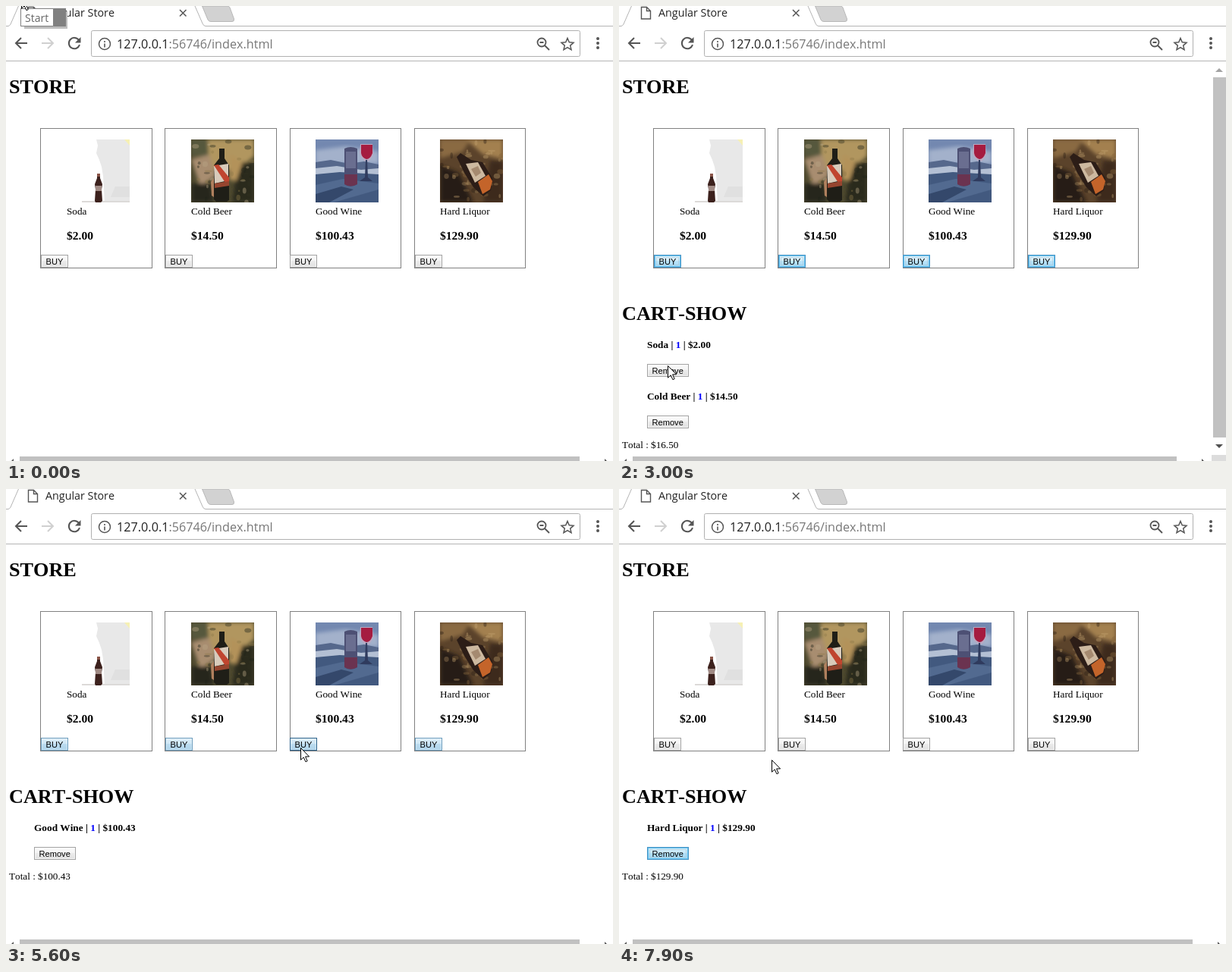
Write an HTML page that moves like this. It is 800 px wide and 600 px high and loops after 8000 ms.

```html
<!DOCTYPE html>
<html lang="en">
<head>
<meta charset="utf-8">
<title>Store</title>
<style>
  html, body { margin: 0; width: 100%; height: 100%; overflow: hidden; background: #fff; }
  svg { display: block; width: 800px; height: 600px; }
  text { font: 13.2px "Liberation Serif", serif; white-space: pre; font-kerning: none; }
  .ui { font-family: "Open Sans", sans-serif; }
  .bold { font-size: 13.3px; font-weight: bold; }
  .h1 { font-size: 26.2px; font-weight: bold; }
  .price { font-size: 15.6px; font-weight: bold; }
  .btn text { font: 11.1px "Liberation Sans", sans-serif; }
  .btn .face { fill: url(#normal); stroke: #a2a2a2; }
  .btn .inner { fill: none; stroke: #fcfcfc; stroke-opacity: .7; }
  .btn .pulse { fill: #7cc6ee; opacity: 0; }
  .hover .face { fill: url(#hover); stroke: #6c9dbd; }
  .hover .inner { stroke-opacity: .35; }
  .over .face { stroke: #2c628b; }
  .focus .face { fill: url(#focus); stroke: #4a94c4; }
  .focus .inner { stroke: #62c0ee; stroke-opacity: 1; }
  .focus .pulse { opacity: var(--pulse); }
  .dots { fill: none; stroke: none; }
  .focus .dots { stroke: #a3bccb; stroke-dasharray: 1 1; }
  .icon { fill: none; stroke: #555; stroke-width: 2; }
</style>
</head>
<body>
<svg viewBox="0 0 800 600">
  <defs>
    <linearGradient id="normal" x2="0" y2="1">
      <stop stop-color="#fbfbfb"/><stop offset=".5" stop-color="#f3f3f3"/>
      <stop offset=".5" stop-color="#ebebeb"/><stop offset="1" stop-color="#e0e0e0"/>
    </linearGradient>
    <linearGradient id="hover" x2="0" y2="1">
      <stop stop-color="#deeef8"/><stop offset=".5" stop-color="#cde6f5"/>
      <stop offset=".5" stop-color="#bcdcf0"/><stop offset="1" stop-color="#add3ea"/>
    </linearGradient>
    <linearGradient id="focus" x2="0" y2="1">
      <stop stop-color="#e4f4fd"/><stop offset=".5" stop-color="#d2edfb"/>
      <stop offset=".5" stop-color="#bce4fa"/><stop offset="1" stop-color="#a5daf7"/>
    </linearGradient>
    <clipPath id="frame"><path d="M0 0h83v83H0z"/></clipPath>
    <filter id="soft"><feGaussianBlur stdDeviation="2.500"/></filter>
  </defs>

  <g id="browser">
    <path d="M0 26.500H3Q5 26 6 24L16.500 0M249 0L259 23Q260.500 26.500 263 26.500H800M0 72.500H800" fill="none" stroke="#b4b4b4"/>
    <path d="M258.500 0H292Q294 0 295 2L300.500 17Q301 20.500 298 20.500H270Q267 20.500 266 18Z" fill="#d2d2d2" stroke="#b8b8b8"/>
    <path d="M29.500 1.500H36.500L41.500 6.500V17H29.500ZM36.500 1.500V6.500H41.500" fill="#fff" stroke="#555" stroke-width="1.400"/>
    <text class="ui" x="52" y="14" style="font-size:14.300px" fill="#222">Angular Store</text>
    <path class="icon" d="M229 5l8.500 8.500M237.500 5l-8.500 8.500" style="stroke-width:1.500"/>
    <path class="icon" d="M28 49H13M20 42L13 49L20 56"/>
    <path class="icon" d="M47 49H62M55 42L62 49L55 56" style="stroke:#d0d0d0"/>
    <path class="icon" d="M96 45A7.200 7.200 0 1 0 97 51"/>
    <path d="M98.500 41V48.500H91Z" fill="#555"/>
    <rect x="112.500" y="32.500" width="644" height="34" rx="2" fill="#fff" stroke="#b0b0b0"/>
    <circle class="icon" cx="130" cy="50" r="7.500" style="stroke-width:1.500"/>
    <path class="icon" d="M130 46v2M130 49.500v5" style="stroke-width:1.600"/>
    <text class="ui" x="146" y="56" style="font-size:16.200px" fill="#222">127.0.0.1<tspan fill="#777">:56746/index.html</tspan></text>
    <circle class="icon" cx="706" cy="48" r="5.500" style="stroke-width:1.800"/>
    <path class="icon" d="M710 52L716 58M703.500 48h5" style="stroke-width:1.800"/>
    <path class="icon" d="M740 42.500l2.300 5.300 5.700.5-4.300 3.800 1.300 5.600-5-3-5 3 1.300-5.600-4.300-3.800 5.700-.5z" style="stroke-width:1.500"/>
    <path d="M780 43h.01M780 49h.01M780 55h.01" stroke="#555" stroke-width="4" stroke-linecap="round"/>
  </g>

  <text class="h1" x="4" y="115">STORE</text>
  <g id="cards"></g>
  <g id="cart"></g>
  <g id="scrollbars"></g>

  <g id="label">
    <path d="M24 7H81V30H24z" fill="#bdbdbd"/>
    <path d="M19 3H79V27H19z" fill="#808080"/>
    <path d="M19.500 3.500H62.500V26.500H19.500z" fill="#fff" stroke="#808080"/>
    <text class="ui" x="25" y="21" style="font-size:14px" fill="#666">Start</text>
  </g>
  <path id="cursor" d="M.5.5V16.200L4.200 12.800 6.900 18.700 9.200 17.700 6.600 11.900H11.600Z" fill="#fff" stroke="#000"/>
</svg>

<script>
const LOOP = 8000, STEP = 100;
const $ = id => document.getElementById(id);

const products = [
  { name: 'Soda', price: 2 },
  { name: 'Cold Beer', price: 14.5 },
  { name: 'Good Wine', price: 100.43 },
  { name: 'Hard Liquor', price: 129.9 }
];

// Time of each click and what the cart then holds.
const carts = [
  [0, []], [1400, [0]], [2300, [0, 1]], [3400, [1]], [4300, []],
  [5600, [2]], [6100, [2, 3]], [7300, [3]]
];

// Pointer stops: time, x, y.
const stops = [
  [0, 20, -13], [100, 8, 12], [300, 10, 90], [900, 69, 328], [1000, 69, 328],
  [1200, 67, 333], [1700, 67, 333], [2100, 231, 334], [2500, 231, 334],
  [3000, 64, 474], [3100, 66, 476], [3500, 66, 476], [4000, 72, 493],
  [4100, 70, 480], [4300, 66, 478], [4500, 39, 480], [4600, 39, 480],
  [5500, 388, 341], [5700, 388, 341], [6000, 556, 336], [6300, 556, 336],
  [6400, 527, 336], [6500, 510, 374], [6600, 510, 374], [7200, 62, 478],
  [7300, 62, 478], [7500, 62, 546], [7700, 150, 109], [7900, 201, 357], [8000, 201, 357]
];

const money = n => '$' + n.toFixed(2);
const text = (x, y, s, cls = '') => `<text class="${cls}" x="${x}" y="${y}">${s}</text>`;
const shape = (d, fill) => `<path d="${d}" fill="${fill}"/>`;
const box = (x, y, w, h, cls) =>
  `<rect class="${cls}" x="${x}" y="${y}" width="${w}" height="${h}"/>`;

function button(x, y, w, label, cls = '') {
  return `<g class="btn ${cls}">` +
    box(x + .5, y + .5, w - 1, 16, 'face') + box(x + 1, y + 1, w - 2, 15, 'pulse') +
    box(x + 1.5, y + 1.5, w - 3, 14, 'inner') + box(x + 3.5, y + 3.5, w - 7, 10, 'dots') +
    text(x + 6.5, y + 13, label) + '</g>';
}

function speckle(seed, count, colors) {
  const random = () => (seed = seed * 16807 % 2147483647) / 2147483647;
  let out = '';
  for (let i = 0; i < count; i++) {
    const fill = colors[Math.floor(random() * colors.length)];
    out += `<ellipse cx="${random() * 83}" cy="${random() * 83}" rx="${1 + random() * 4}" ry="${1 + random() * 3}" fill="${fill}" opacity=".4"/>`;
  }
  return out;
}

const blurred = s => `<g filter="url(#soft)">${s}</g>`;

const photos = [
  shape('M0 0H83V83H0z', '#e8e8e8') +
  shape('M0 0H39L41 8 39 18 43 27 46 36 48 48 50 83H0z', '#fff') +
  shape('M76 0H83V8z', '#f6f0b4') +
  shape('M58 76L64 62H83V76z', '#e0e0e0') + shape('M20 81H83V83H20z', '#dcdad8') +
  shape('M40 45H44V51L47 59 46 66 47 81 45 83H38L37 81 38 66 37 59 40 51z', '#3c211d') +
  shape('M38 61H46V68H38z', '#a08a84') + shape('M40 45H44V49H40z', '#8a5548'),

  shape('M0 0H83V83H0z', '#4f4a30') +
  blurred(shape('M0 0H26V22H0z', '#56583c') + shape('M22 0H83V22L62 40H24z', '#b1965f') +
    shape('M62 30H83V83H54z', '#2b2a1f') + shape('M0 26L24 20 33 48 12 62z', '#a88d70') +
    shape('M0 58H26L30 83H0z', '#26281c') + shape('M52 20L68 30 60 54H50z', '#b3925a')) +
  speckle(71, 40, ['#b9a886', '#2f2f20', '#8c7749', '#1f2218']) +
  shape('M26 56L34 46 36 80 27 74z', '#b0805e') +
  shape('M37 12H44V25L50 34V80L47 82H33L30 79V34L37 25z', '#1f1e17') +
  shape('M30 35L49 32V54L31 58z', '#d8cbbb') + shape('M30 34L36 33 50 50V56L45 57z', '#c0452f') +
  shape('M31 58L50 55V61L31 64z', '#96452f'),

  shape('M0 0H83V83H0z', '#7388b0') +
  blurred(shape('M0 14L40 9 83 16V32H0z', '#a3b1cb')) +
  shape('M0 30L20 27 44 32 64 29 83 33V48H0z', '#56688c') +
  shape('M0 38L28 35 60 40 83 38V48H0z', '#b4c0d4') +
  shape('M0 46L32 43 83 46V83H0z', '#42597f') +
  shape('M0 60L36 52 83 58V66L24 83H0z', '#526a90') + shape('M0 72L34 62 50 66 18 83H0z', '#34486b') +
  shape('M38 12Q46 8 55 12V59Q46 65 38 59z', '#4d5074') +
  shape('M40 16H53V38H40z', '#6a6e90') + shape('M38 46H55V59Q46 64 38 59z', '#6b3350') +
  shape('M59 6H75L76 19Q73 29 67 29 60 27 58 18z', '#b9a9c2') +
  shape('M60 7H75L75 18Q72 26 67 26 61 24 60 18z', '#a51c40') +
  shape('M66 27H68L69 50 75 55H58L65 50z', '#2f3b5e'),

  shape('M0 0H83V83H0z', '#5b432b') +
  blurred(shape('M0 0H40L30 16 0 25z', '#8a6b43') + shape('M34 0H83V26L57 20z', '#a3804f') +
    shape('M0 34L25 44 44 83H0z', '#271c15') + shape('M66 28H83V83H57z', '#3d2c1f')) +
  speckle(203, 50, ['#a3845a', '#2a1d15', '#8a683e', '#c0a06e']) +
  shape('M22 23L27 18 41 27 56 30 69 51 67 67 57 75 44 63 32 44z', '#2c1d17') +
  shape('M34 32L50 30 60 48 46 57z', '#cdb9a0') +
  shape('M50 56L64 46 69 55 66 66 56 72z', '#c4642a') + shape('M41 39L50 35 54 44 47 49z', '#a58a70')
];

$('cards').innerHTML = products.map((p, i) => {
  const left = Math.round(45 + 164.3 * i), inner = Math.round(79.6 + 164.2 * i);
  return `<rect x="${left + .5}" y="161.5" width="${i < 2 ? 147 : 146}" height="184" fill="#fff" stroke="#808080"/>` +
    `<g transform="translate(${inner} 176)" clip-path="url(#frame)">${photos[i]}</g>` +
    text(inner, 275, p.name) + text(inner, 308, money(p.price), 'price') +
    button(Math.round(45.8 + 164.3 * i), 328, 36, 'BUY');
}).join('');
const buyButtons = [...$('cards').querySelectorAll('.btn')];

function drawCart(items, removing) {
  if (!items.length) return '';
  const rows = items.map((id, i) => {
    const { name, price } = products[id], y = 451 + 68.4 * i;
    return text(37, y, `${name} | <tspan fill="#00f">1</tspan> | ${money(price)}`, 'bold') +
      button(37, Math.round(y + 21), 55, 'Remove', removing ? 'focus' : '');
  });
  const total = items.reduce((sum, id) => sum + products[id].price, 0);
  return text(4, 414, 'CART-SHOW', 'h1') + rows.join('') +
    text(4, 447 + 68 * items.length, 'Total : ' + money(total));
}

function drawScrollbars(tall) {
  const right = tall ? 735 : 756;
  return shape(`M18 594H${right}V600H18z`, '#c1c1c1') +
    shape('M10 597V600H7z', '#555') + shape(`M${right + 33} 597V600H${right + 36}z`, '#555') +
    (tall ? shape('M783 94H800V569H783z', '#c1c1c1') + shape('M781 592H800V600H781z', '#dcdcdc') +
      shape('M786 87L791 82 796 87z', '#a3a3a3') + shape('M786 578H796L791 583z', '#505050') : '');
}

function pointerAt(t) {
  const i = stops.findIndex(s => s[0] > t);
  const [t0, x0, y0] = stops[i - 1], [t1, x1, y1] = stops[i];
  const k = (t - t0) / (t1 - t0), ease = k * k * (3 - 2 * k);
  return [x0 + (x1 - x0) * ease, y0 + (y1 - y0) * ease].map(Math.round);
}

function render(t) {
  const index = carts.filter(c => c[0] <= t).length - 1;
  const items = carts[index][1];
  const removing = index > 0 && items.length < carts[index - 1][1].length;
  const buying = index > 0 && !removing;
  const [x, y] = pointerAt(t);

  $('label').style.display = t < STEP ? '' : 'none';
  $('cursor').setAttribute('transform', `translate(${x} ${y})`);
  $('cart').innerHTML = drawCart(items, removing);
  $('scrollbars').innerHTML = drawScrollbars(items.length > 1);

  const over = buyButtons.map((_, i) => {
    const left = 45.8 + 164.3 * i;
    return y >= 328 && y < 345 && x >= left && x < left + 36;
  });
  const anyOver = over.includes(true);
  buyButtons.forEach((b, i) => {
    const state = over[i] ? 'hover over' : !buying ? '' : anyOver ? 'hover' : 'focus';
    b.setAttribute('class', 'btn ' + state);
  });
  const pulse = .5 + .5 * Math.cos(2 * Math.PI * (t / 1700 - .28));
  document.documentElement.style.setProperty('--pulse', (.8 * pulse).toFixed(3));
}

let shown = -1;
const start = performance.now();
function tick() {
  const t = Math.floor((performance.now() - start) % LOOP / STEP) * STEP;
  if (t !== shown) render(shown = t);
  requestAnimationFrame(tick);
}
tick();
</script>
</body>
</html>
```
